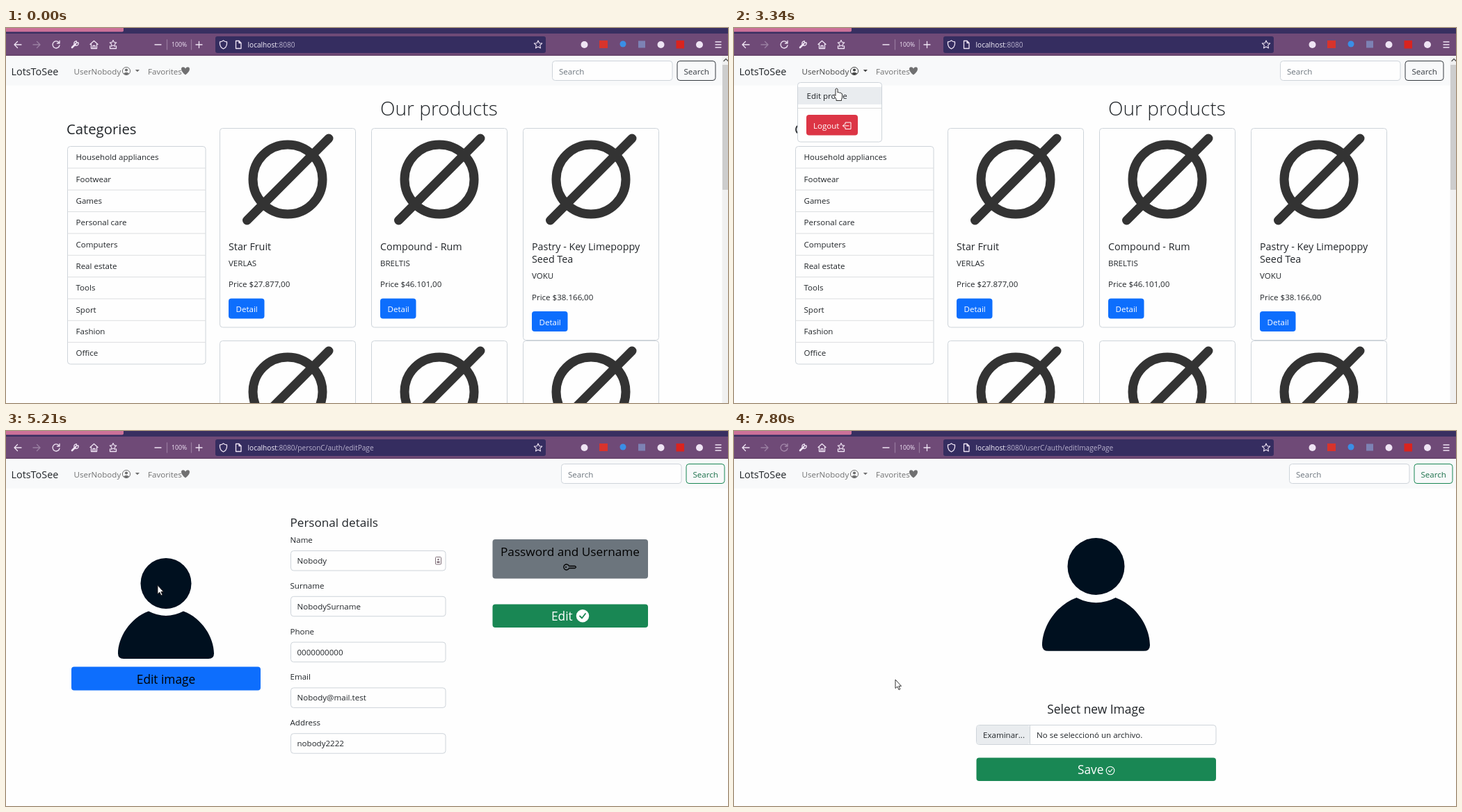
These frames come from a looping animation (1038 px wide and 540 px high, 8000 ms). An HTML page:

```html
<!DOCTYPE html>
<html lang="en">
<head>
<meta charset="utf-8">
<title>Shop profile walkthrough</title>
<style>
html, body { margin: 0; width: 100%; height: 100%; overflow: hidden; background: #fefefe; }
svg { display: block; width: 100%; height: 100%; font: 11.55px "Open Sans", "Noto Sans", sans-serif; fill: #212529; }
.line { fill: none; stroke: #efe4f4; stroke-width: 1.3; stroke-linecap: round; stroke-linejoin: round; }
.box { fill: #fefefe; stroke: #ced4da; }
.nav { fill: #000; fill-opacity: .55; }
.white { fill: #fff; }
.mid { text-anchor: middle; }
</style>
</head>
<body>
<svg id="stage" viewBox="0 0 1038 540" preserveAspectRatio="none"></svg>
<script>
const LOOP = 8000;
const stage = document.getElementById('stage');

const text = (x, y, s, size = 11.55, attrs = '') =>
  `<text x="${x}" y="${y}" font-size="${size}" ${attrs}>${s}</text>`;
const rect = (x, y, w, h, fill, r = 0, attrs = '') =>
  `<rect x="${x}" y="${y}" width="${w}" height="${h}" rx="${r}" fill="${fill}" ${attrs}/>`;
const box = (x, y, w, h, r = 4) => rect(x, y, w, h, '#fefefe', r, 'class="box"');
const dot = (x, y, r, fill, attrs = '') => `<circle cx="${x}" cy="${y}" r="${r}" fill="${fill}" ${attrs}/>`;
const line = (d, attrs = '') => `<path class="line" d="${d}" ${attrs}/>`;
const group = (id, body, attrs = '') => `<g id="${id}" ${attrs}>${body}</g>`;
const at = (x, y, body, scale = 1) => `<g transform="translate(${x} ${y}) scale(${scale})">${body}</g>`;

const star = (x, y, r) => {
  let d = '';
  for (let i = 0; i < 10; i++) {
    const a = i * Math.PI / 5, q = i % 2 ? r * .48 : r;
    d += `${i ? 'L' : 'M'}${(x + q * Math.sin(a)).toFixed(1)} ${(y - q * Math.cos(a)).toFixed(1)}`;
  }
  return line(d + 'Z', 'style="stroke-width:1.1"');
};

function toolbar() {
  return rect(0, 0, 1038, 8, '#382f61') + rect(-4, -4, 173, 9.5, '#cc7199', 2) +
    rect(0, 8, 1038, 32, '#6f4a77') + rect(0, 38.5, 1038, 1.5, '#644269') +
    line('M22 24H12M16.500 19.500L12 24L16.500 28.500') +
    line('M39 24H49M44.500 19.500L49 24L44.500 28.500', 'opacity=".35"') +
    group('reload', line('M76 20.800A5 5 0 1 0 77 25M77 18.500V22H73.500')) +
    group('stop', line('M68 20L76 28M76 20L68 28')) +
    line('M95 28L100 23', 'style="stroke-width:2.600"') +
    line('M104 21A3.200 3.200 0 1 1 101.500 19L101.200 21.500Z') +
    line('M121 23.500L126.500 18.500L132 23.500M122.500 23V29.500H130.500V23M125 29V25.500H128V29') +
    star(154, 22.5, 5) + line('M149.500 26V29.500H158.500V26') +
    line('M214 24H223M273 24H282M277.500 19.500V28.500') +
    line('M231.500 17V31M266.500 17V31', 'opacity=".3"') +
    text(238, 27.2, '100%', 8.7, 'fill="#efe4f4"') +
    rect(301, 12, 475, 24, '#352d60', 3) +
    line('M312.500 18Q315 20 317.500 20V23Q317 28 312.500 30Q308 28 307.500 23V20Q310 20 312.500 18Z') +
    line('M330.500 18.500H335L338 21.500V29.500H330.500ZM335 18.500V21.500H338') +
    text(347.5, 28, '<tspan fill="#f4f0fa">localhost</tspan>:8080<tspan id="path"></tspan>', 10.1, 'fill="#b9b2cd"') +
    star(765, 24, 6) +
    dot(831.5, 24, 5, '#efe4f4') + rect(853, 18, 12, 11, '#d8342c') + dot(887, 23, 4.5, '#3a8ee6') +
    rect(909, 18.5, 10, 10, '#7d82b4') + dot(941.5, 24, 5, '#efe4f4') +
    rect(963.5, 18, 11.5, 11.5, '#d9241f') + dot(997, 24, 5, '#efe4f4') +
    line('M1020 20H1028M1020 24H1028M1020 28H1028');
}

function navbar() {
  const search = box(785.5, 47.5, 172.500, 28) + text(795, 66.5, 'Search', 11.55, 'fill="#6c757d"') +
    rect(965, 47.5, 55, 28, 'none', 4, 'id="searchBox"') + text(974.500, 66.5, 'Search', 11.55, 'id="searchText"');
  return rect(0, 40, 1038, 42.5, '#f8f9fa') + text(7.5, 67.5, 'LotsToSee', 14.4) +
    group('user', text(97.5, 66.5, 'UserNobody') +
      dot(173, 62, 5.600, 'none', 'stroke="#000"') + dot(173, 60.500, 2.100, '#000') +
      '<path d="M169 65.500Q173 62 177 65.500Q173 69 169 65.500ZM185.800 60H192L188.900 63.200Z"/>', 'class="nav"') +
    `<g class="nav">${text(204, 66.5, 'Favorites')}
      <path d="M258 67.500C251 63 250.500 56.500 254.500 56.300Q257 56.200 258 58.500Q259 56.200 261.500 56.300C265.500 56.500 265 63 258 67.500Z"/></g>` +
    group('search', search);
}

function card(x, y, title, brand, price) {
  const extra = (title.length - 1) * 18.5, by = 389.5 + extra;
  return at(x, y, box(.5, 144.5, 195, 286.5 + extra) +
    '<g fill="none" stroke="#333" stroke-width="13" stroke-linecap="round">' +
    '<circle cx="98" cy="218" r="50"/><path d="M39.500 277L157 159"/></g>' +
    title.map((s, i) => text(13, 319.5 + i * 18.5, s, 14.3)).join('') +
    text(13, 342.5 + extra, brand) + text(13, 373 + extra, 'Price $' + price) +
    rect(13, by, 51.5, 29, '#0d6efd', 4) + text(23.5, by + 19.5, 'Detail', 11.55, 'class="white"'));
}

function home() {
  const names = ['Household appliances', 'Footwear', 'Games', 'Personal care', 'Computers',
    'Real estate', 'Tools', 'Sport', 'Fashion', 'Office'];
  const cards = [[['Star Fruit'], 'VERLAS', '27.877,00'], [['Compound - Rum'], 'BRELTIS', '46.101,00'],
    [['Pastry - Key Limepoppy', 'Seed Tea'], 'VOKU', '38.166,00']];
  return text(538, 126, 'Our products', 28.1, 'font-weight="300"') + text(87, 153, 'Categories', 20.3) +
    box(88.5, 170.5, 198.5, 313.5) +
    names.map((s, i) => text(100.5, 190.2 + i * 31.35, s) +
      (i ? rect(88.5, 170 + i * 31.35, 198.5, 1, '#dcdee0') : '')).join('') +
    [0, 306].map(y => cards.map((c, i) => card(307 + i * 218, y, ...c)).join('')).join('') +
    rect(1029.5, 40, 8.5, 500, '#f0f0f0') + rect(1030, 53, 8, 180, '#cdcdcd') +
    line('M1032 47.500L1035 44.500L1038 47.500', 'style="stroke:#505050"') +
    group('menu', box(91.5, 78.5, 121, 85.5) + rect(92, 85, 120, 25, '#e9ecef', 0, 'id="hover"') +
      text(104.5, 102, 'Edit profile') + rect(92, 115, 120, 1, '#d9d9d9') +
      rect(104, 125, 74, 29.5, '#dc3545', 4) + text(114, 145.3, 'Logout', 11.55, 'class="white"') +
      line('M160 138.500V136H168V145.500H160V143M165 140.800H156.500M159 138.300L156.500 140.800L159 143.300', 'style="stroke:#fff;stroke-width:1"'));
}

const person = (x, y, scale) => at(x, y, `<g fill="#00101f">${dot(0, 0, 36.5, '#00101f')}
  <path d="M-25 40Q0 53 25 40C52 50 69 78 69 101Q69 108.500 61 108.500H-61Q-69 108.500 -69 101C-69 78 -52 50 -25 40Z"/></g>`, scale);

function form() {
  const fields = { Name: 'Nobody', Surname: 'NobodySurname', Phone: '0000000000',
    Email: 'Nobody@mail.test', Address: 'nobody2222' };
  return person(230, 219.5, 1) + rect(94, 339.5, 272, 34, '#0d6efd', 4, 'id="editImage"') +
    text(230, 363.5, 'Edit image', 17.3, 'class="mid" fill="#000"') +
    text(408.5, 137.500, 'Personal details', 17.1) +
    Object.entries(fields).map(([label, value], i) => at(0, i * 65.8,
      text(408.5, 161, label) + box(409.5, 172.5, 222.5, 28.5) + text(418.5, 191, value))).join('') +
    rect(617.5, 181.5, 8, 10.5, '#fff', 1, 'stroke="#806f78"') + dot(621.5, 185, 1.3, '#806f78') +
    rect(619.5, 187.5, 4, 2.5, '#806f78') +
    rect(699.5, 156, 223.5, 56.5, '#6c757d', 4) +
    text(811, 180, 'Password and Username', 17.2, 'class="mid" fill="#000"') +
    line('M809.500 194.500A4 4 0 1 0 809.500 197.500H818L819.500 196L818 194.500Z', 'style="stroke:#000"') +
    dot(805, 196, 1, '#000') +
    rect(699.5, 249.5, 223.5, 33.5, '#198754', 4) + text(784, 273, 'Edit', 17.3, 'class="white"') +
    dot(829, 266.3, 9.200, '#fff') + line('M825 266.500L828 269.500L833 263', 'style="stroke:#198754;stroke-width:1.800"');
}

function picture() {
  return person(520.5, 195, 1.123) + text(520.5, 407, 'Select new Image', 17.4, 'class="mid"') +
    box(348.5, 423.5, 344.5, 28) + rect(349, 424, 76, 27, '#e9ecef', 3) + rect(425, 424, 1, 27, '#ced4da') +
    text(358, 442, 'Examinar...') + text(435, 442, 'No se seleccionó un archivo.') +
    rect(348.5, 470.5, 344.5, 33.5, '#198754', 4) + text(494, 494, 'Save', 17.3, 'class="white"') +
    dot(541, 489, 5.800, 'none', 'stroke="#fff" stroke-width="1.100"') +
    line('M538.500 489L540.500 491L543.800 487', 'style="stroke:#fff;stroke-width:1.100"');
}

stage.innerHTML = rect(0, 0, 1038, 540, '#fefefe') + toolbar() + navbar() +
  group('home', home()) + group('form', form()) + group('picture', picture()) +
  group('pointer', dot(0, 0, 9, '#c0bf24', 'id="click" fill-opacity=".75"') +
    '<g fill="#fff" stroke="#1c1c1c" stroke-width=".9" stroke-linejoin="round">' +
    '<path id="arrow" d="M0 0V12.500L2.900 10L5 14.600L6.900 13.700L4.900 9.300H8.500Z"/>' +
    '<path id="hand" d="M-1.500 1Q0-1 1.500 1V6Q3 5 4 6.300Q6 5.700 6.500 7Q8 7 8 9V12Q8 14 7 15.500V17.500H-.5V15.500L-3.500 11Q-4.500 9 -3.200 8.800L-1.500 10.500Z"/></g>');

const $ = {};
for (const el of stage.querySelectorAll('[id]')) $[el.id] = el;
const show = (id, on) => $[id].style.display = on ? '' : 'none';

// time, x, y, optional easing power for the way there
const track = [[170, 972, 528], [930, 549, 346], [1760, 200, 108], [1880, 163, 77], [2160, 155, 67],
  [2830, 155, 67], [3340, 147.5, 87], [3550, 141, 95], [4310, 141, 95], [5070, 205, 191, 2],
  [5210, 218, 222], [5900, 232, 358]];

function pointerAt(t) {
  const i = track.findIndex(k => k[0] > t);
  if (i < 0) return track[track.length - 1].slice(1, 3);
  if (i === 0) return track[0].slice(1, 3);
  const a = track[i - 1], b = track[i], u = ((t - a[0]) / (b[0] - a[0])) ** (b[3] || 1);
  return [a[1] + (b[1] - a[1]) * u, a[2] + (b[2] - a[2]) * u];
}

function draw(t) {
  const within = (a, b) => t >= a && t < b;
  const [x, y] = pointerAt(t);
  const page = t < 4310 ? 'home' : t < 7380 ? 'form' : 'picture';
  const first = page === 'home', menu = within(2300, 3890);
  for (const id of ['home', 'form', 'picture']) show(id, id === page);

  const onUser = first && x > 97 && x < 192 && y > 52 && y < 73;
  const onItem = menu && y > 85 && y < 110;
  const onButton = page === 'form' && y > 340;
  const hand = onUser || onItem || onButton;
  show('menu', menu);
  show('hover', onItem);
  $.user.style.fillOpacity = $.user.style.strokeOpacity = onUser || menu ? .72 : .55;
  $.editImage.setAttribute('fill', onButton ? '#0b5ed7' : '#0d6efd');

  $.search.setAttribute('transform', `translate(${first ? 0 : 13} 0)`);
  $.searchBox.setAttribute('stroke', first ? '#343a40' : '#198754');
  $.searchText.setAttribute('fill', first ? '#343a40' : '#1a704a');

  const loading = within(4020, 4310) || within(7170, 7590);
  show('stop', loading);
  show('reload', !loading);
  $.reload.setAttribute('opacity', within(4310, 4950) || t >= 7590 ? .4 : 1);
  $.path.textContent = t < 4020 ? '' : t < 7170 ? '/personC/auth/editPage' : '/userC/auth/editImagePage';

  show('pointer', t >= 170);
  show('arrow', !hand);
  show('hand', hand);
  show('click', within(2300, 2570) || within(3750, 3960) || within(6630, 6770));
  $.pointer.setAttribute('transform', `translate(${x.toFixed(1)} ${y.toFixed(1)})`);
}

const start = performance.now();
function tick() {
  draw((performance.now() - start) % LOOP);
  requestAnimationFrame(tick);
}
tick();
</script>
</body>
</html>
```
